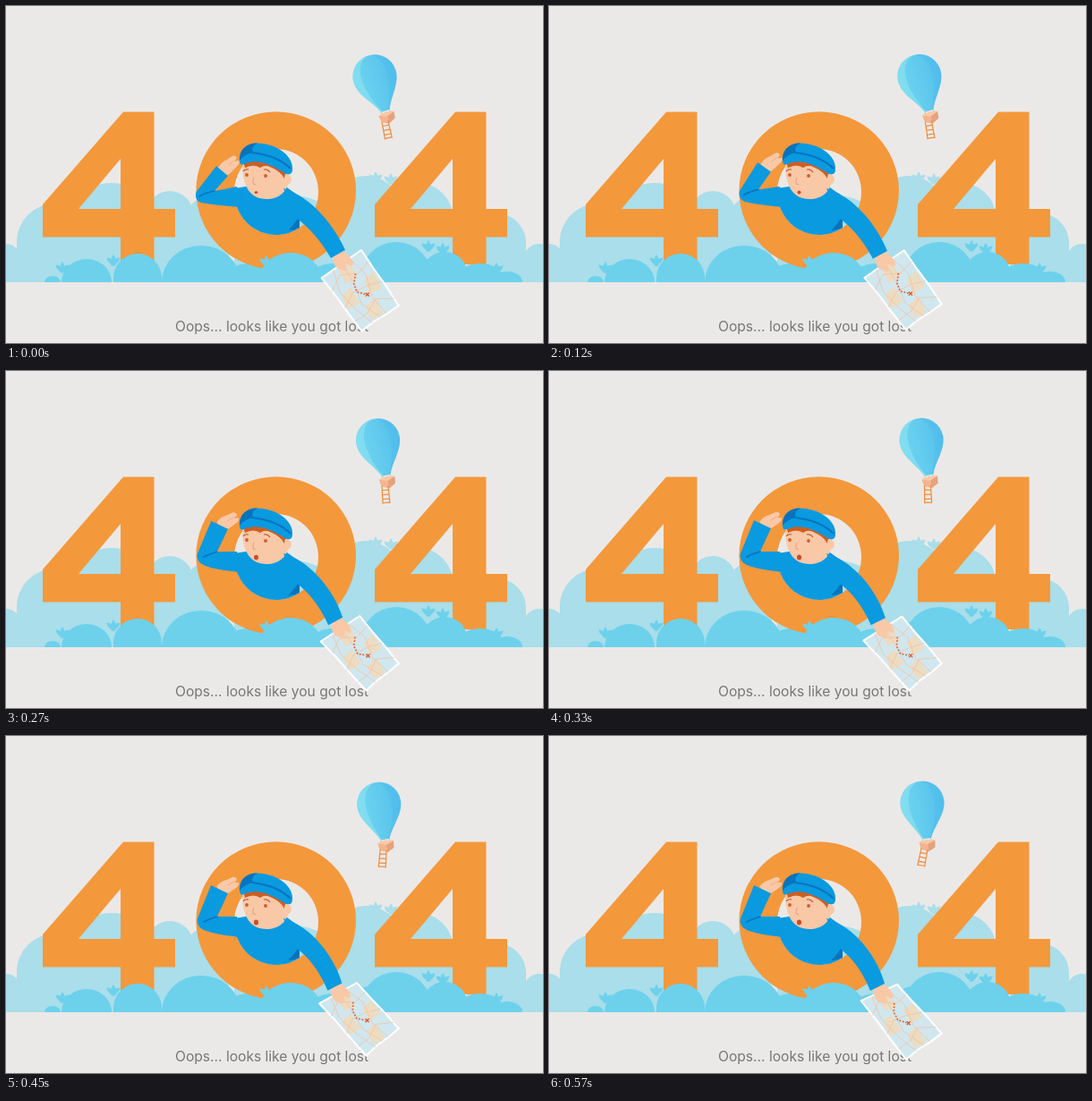
An HTML page for the animation above (600 ms loop, 600x377 px).

```html
<!DOCTYPE html>
<html lang="en">
<head>
<meta charset="utf-8">
<title>404</title>
<style>
  html, body { margin: 0; width: 100%; height: 100%; overflow: hidden; background: #ebe9e7; }
  svg { display: block; width: 100%; height: 100%; }
  text { font: 15.6px Inter, "Open Sans", sans-serif; fill: #777675; }
</style>
</head>
<body>
<svg viewBox="0 0 600 377">
  <defs>
    <path id="four" fill="#f4983c" fill-rule="evenodd"
      d="M131 118.5H165.5V227H189V258.5H165.5V289H128V258.5H41V222ZM128 171V227H81Z"/>
    <linearGradient id="sky">
      <stop offset="0" stop-color="#6fd6ef"/><stop offset="1" stop-color="#55bfec"/>
    </linearGradient>
  </defs>

  <path id="backBush" fill="#a9deea"/>
  <use href="#four"/>
  <use href="#four" x="371"/>
  <path id="leftBush" fill="#6dd1ec"/>
  <path fill="#f4983c" fill-rule="evenodd" d="M212.4 206.5a89.3 88.3 0 0 1 178.6 0a89.3 88.3 0 0 1-178.6 0Z
    M255 208a47 48 0 0 0 94 0a47 48 0 0 0-94 0Z"/>
  <path id="rightBush" fill="#6dd1ec"/>
  <text x="189" y="363.5">Oops... looks like you got lost</text>

  <g id="balloon">
    <path d="M-4 40L-6 43M4 40L6 43" stroke="#d8b9a6" stroke-width=".8"/>
    <path fill="url(#sky)" d="M-24.5 0A24.5 24.5 0 0 1 24.5 0C24.5 15 10 27 5 40H-5C-10 27-24.5 15-24.5 0Z"/>
    <path fill="#8de2f1" opacity=".65" d="M-2-24.4C-21-17-17 14-3 40H-5C-10 27-24.5 15-24.5 0C-24.5-13-15-24-2-24.4Z"/>
    <path fill="#49baea" opacity=".4" d="M2-24.4C20-16 16 16 3 40H5C10 27 24.5 15 24.5 0C24.5-13 15-24 2-24.4Z"/>
    <path fill="#f9c9a8" d="M-9 43L0 41L9 43L0 47Z"/>
    <path fill="#f4b48e" d="M-9 43L0 46.5V55L-8 51Z"/>
    <path fill="#e5a27c" d="M9 43L0 46.5V55L8 51Z"/>
  </g>
  <path id="ladder" fill="none" stroke="#f18b3b" stroke-width="1.2"
    d="M-3.5 0L-4 20M3.5 0L4 20M-3.6 5H3.6M-3.8 10H3.8M-4 15H4M-4 19H4"/>

  <path fill="#099ae0" d="M255 204Q285 198 314 203L340 222L328 236V248A47 48 0 0 1 255 208Z"/>
  <path fill="#0873bd" d="M328 234V248Q322 251 315 251Q323 244 328 234Z"/>

  <g id="hand" fill="#f9c8a7">
    <path d="M-3-6Q4-9 10-7L18-6Q22-4 20-1L16 0L20 2Q21 5 16 6L7 7Q1 8-3 6Z"/>
    <path d="M8-1H16" stroke="#eaa987" stroke-width=".8"/>
  </g>
  <path id="sleeve" fill="#099ae0"/>
  <path id="crease" fill="none" stroke="#0873bd" stroke-width="1.6" stroke-linecap="round"/>

  <circle cx="313" cy="194" r="6" fill="#f9c8a7"/>
  <path fill="#f9c8a7" d="M264 177Q264 166 288 168Q316 173 316 192C316 208 304 216 291 216C273 216 264 202 264 177Z"/>
  <path fill="#cf5e20" d="M264 169Q284 165 314 186Q311 188 311 193Q307 185 295 180Q289 177 284 181Q277 176 267 181Z"/>
  <path fill="#099ae0" d="M261 174C261 160 270 153 281 153.5C303 154 322 168 320 184Q319 190 312 187.5C298 178 280 170 266 177Q262 179 261 174Z"/>
  <path fill="#0873bd" d="M261 173C260 160 270 153 281 153.5Q273 157 276 164Q266 166 261 173Z"/>
  <path fill="none" stroke="#0873bd" stroke-width="2" d="M275 164Q303 167 318 182"/>
  <path fill="none" stroke="#b75328" stroke-width="1.1" d="M265 185Q267 182 271 183M288 183Q292 182 295 186"/>
  <g fill="#d65a28"><circle cx="269" cy="189" r="1.9"/><circle cx="290" cy="190" r="1.9"/></g>
  <path fill="none" stroke="#eba486" stroke-width="1.2" d="M277 192Q274 199 279 200"/>
  <ellipse id="mouth" cx="279.5" cy="208.5" fill="#c94c2c"/>

  <g stroke-linejoin="round">
    <path id="sheet" fill="#d0e7ef" stroke="#fff" stroke-width="2"/>
    <path id="land" fill="#ecdcc2"/>
    <path id="roads" fill="none" stroke="#f4c3a0" stroke-width=".8"/>
    <path id="route" fill="none" stroke="#e8602c" stroke-width="1.7" stroke-dasharray="1.8 1.8"/>
    <path id="cross" fill="none" stroke="#e8521f" stroke-width="1.3" d="M-2-2L2 2M2-2L-2 2"/>
  </g>
  <path id="grip" fill="#f9c8a7" d="M-7-1L5-6Q14 1 16 8Q15 12 12 10L7 8L9 15Q6 18 3 15Q-6 15-7-1Z"/>
  <path id="reach" fill="#099ae0"/>
</svg>

<script>
const STEP = 30, LOOP = 600, GROUND = 309;
const set = (id, name, value) => document.getElementById(id).setAttribute(name, value);
const mix = (a, b, k) => a + (b - a) * k;
const point = (x, y) => `${x.toFixed(2)} ${y.toFixed(2)}`;
const pair = (x0, y0, x1, y1, k) => point(mix(x0, x1, k), mix(y0, y1, k));
const place = (id, x, y, angle = 0) => set(id, 'transform', `translate(${x} ${y}) rotate(${angle})`);
const ease = x => { x = Math.min(1, Math.max(0, x)); return x * x * (3 - 2 * x); };

// A rounded hump standing on the ground.
function hump([x, top, r]) {
  const h = Math.min(r, GROUND - top);
  return `M${x - r} ${GROUND}V${top + h}A${r} ${h} 0 0 1 ${x + r} ${top + h}V${GROUND}Z`;
}

// Three leaves fanning out from one point.
function tuft([x, y]) {
  return [-50, 0, 50].map(deg => {
    const turn = (px, py) => {
      const a = deg * Math.PI / 180;
      return point(x + px * Math.cos(a) - py * Math.sin(a), y + px * Math.sin(a) + py * Math.cos(a));
    };
    return `M${turn(0, 4)}Q${turn(-5, -4)} ${turn(0, -10)}Q${turn(5, -4)} ${turn(0, 4)}Z`;
  }).join('');
}

const bush = (id, humps, tufts) => set(id, 'd', humps.map(hump).join('') + tufts.map(tuft).join(''));

bush('backBush', [[0, 266, 16], [55, 221, 43], [118, 198, 62], [183, 207, 26], [225, 214, 24],
  [320, 212, 65], [402, 190, 40], [458, 197, 42], [548, 232, 33], [596, 266, 18]],
  [[413, 195], [430, 197]]);
bush('leftBush', [[52, 302, 9], [90, 283, 28], [147, 277, 27], [218, 268, 44], [272, 288, 30]],
  [[63, 296], [120, 288]]);
bush('rightBush', [[318, 276, 36], [365, 288, 28], [407, 280, 26], [436, 264, 40], [490, 275, 26],
  [530, 288, 28], [560, 297, 17]],
  [[291, 289], [472, 272], [488, 275], [548, 297]]);

function drawMap(top, right, bottom, left) {
  // u runs from top to right, v from top to left.
  const at = (u, v) => [0, 1].map(n =>
    mix(mix(top[n], right[n], u), mix(left[n], bottom[n], u), v));
  const line = points => 'M' + points.map(([u, v]) => point(...at(u, v))).join('L');
  const thirds = [0, 1, 2, 3].map(i => i / 3);
  const wave = u => .025 * Math.sin(u * 9);

  set('sheet', 'd', line([...thirds.map(u => [u, wave(u)]),
    ...thirds.map(v => [1 + wave(v), v]),
    ...thirds.map(u => [1 - u, 1 + wave(u)])]) + 'Z');

  let land = '', roads = '';
  for (let i = 0; i < 3; i++) {
    const u = i / 3 + .03, v = i % 2 ? .04 : .34;
    for (const shift of [0, .58]) {
      const a = v + shift;
      if (a < .9) land += line([[u, a], [u + .28, a + .06], [u + .25, a + .34], [u + .04, a + .28]]) + 'Z';
    }
    roads += line(thirds.map(k => [k, .3 + i * .25 - .1 * Math.sin(k * 6 + i)]));
    roads += line(thirds.map(k => [.2 + i * .3 + .08 * Math.sin(k * 7 + i), k]));
  }
  set('land', 'd', land);
  set('roads', 'd', roads);
  set('route', 'd', line([[.24, .38], [.35, .53], [.48, .58], [.58, .46]]));
  place('cross', ...at(.6, .43));
}

function draw(t) {
  const u = t / (LOOP - STEP), drift = u * u;
  const tilt = 17.3 - 7 * u - 3 * drift;
  const x = 412 + 10 * u - 5 * drift, y = 79 - 4 * u ** 1.5;
  const a = tilt * Math.PI / 180, sin = Math.sin(a), cos = Math.cos(a);
  place('balloon', x, y, -tilt);
  place('ladder', x - 4 * cos + 51 * sin, y + 4 * sin + 51 * cos, -12 + 10 * u + 13 * drift);

  const k = ease(u / .55);
  const elbow = pair(212.5, 208, 214, 204, k), notch = pair(233, 207, 236, 202, k);
  place('hand', mix(243, 241, k), mix(184, 172, k), mix(-40, -30, k));
  set('sleeve', 'd', `M${elbow}L${pair(235, 179, 229, 167, k)}` +
    `L${pair(248, 190, 248, 176, k)}L${notch}L258 202L264 225` +
    `Q235 223 ${pair(218, 220, 221, 217, k)}Q${pair(210, 217, 212, 213, k)} ${elbow}Z`);
  set('crease', 'd', `M${notch}Q${pair(222, 209, 226, 205, k)} ${pair(216, 213, 221, 208, k)}`);
  set('mouth', 'rx', mix(1.8, 2.5, k));
  set('mouth', 'ry', mix(1.6, 2.9, k));

  const s = (k + u) / 2;
  set('reach', 'd', `M310 204C338 212 365 242 ${pair(379, 273, 375, 277, s)}` +
    `L${pair(363, 282, 359, 285, s)}Q346 253 324 237Z`);
  place('grip', mix(372, 369, s), mix(280, 283, s));

  const fold = ease((u - .1) / .35) - .7 * ease((u - .8) / .2);
  drawMap([397 - 8 * drift, 273 + 5 * drift], [439, 335 - 8 * fold],
    [397 + 5 * fold, 363 - 6 * fold], [353 - 4 * drift, 304 - 8 * drift]);
}

const start = performance.now();
function tick() {
  const t = (performance.now() - start) % LOOP;
  draw(Math.floor(t / STEP) * STEP);
  requestAnimationFrame(tick);
}
tick();
</script>
</body>
</html>
```
